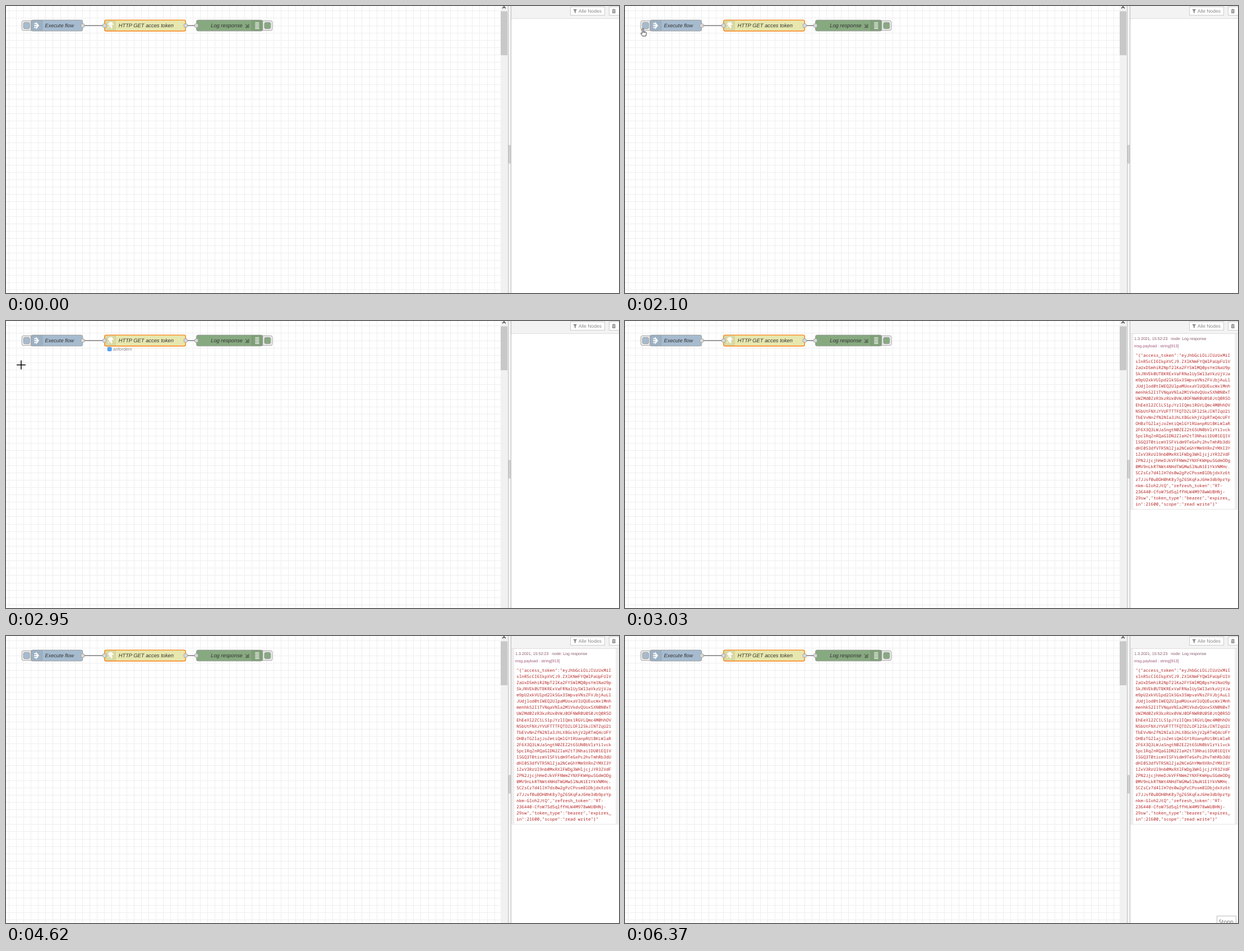
These frames come from a looping animation (1093 px wide and 513 px high, 6.44 s). An HTML page:

```html
<!DOCTYPE html>
<html lang="de">
<head>
<meta charset="utf-8">
<title>Flow editor</title>
<style>
html, body { margin: 0; width: 100%; height: 100%; overflow: hidden; background: #fff; }
svg { display: block; }
text { font-family: "Liberation Sans", Arial, sans-serif; white-space: pre; text-rendering: geometricPrecision; }
.label { font-style: italic; font-size: 9.35px; fill: #333; }
.meta { font-size: 7.15px; }
.payload text { font-family: "Noto Sans Mono", "DejaVu Sans Mono", monospace; font-size: 7.61px; font-weight: 500; fill: #b72828; }
.tip { font-family: "Open Sans", "Noto Sans", sans-serif; font-size: 9.6px; fill: #666; }
</style>
</head>
<body>
<svg id="stage" width="1093" height="513" viewBox="0 0 1093 513">
  <path id="grid" stroke="#eee" fill="none"/>

  <path d="M137 35H175.5M320.5 35H339.5" stroke="#999" stroke-width="2"/>

  <g stroke="#999" stroke-width=".9">
    <rect x="28.2" y="26.4" width="21" height="17.3" rx="3" fill="#eee"/>
    <rect x="31.2" y="29.3" width="11" height="11.4" rx="2.4" fill="#a6bbcf"/>
    <rect x="454" y="26.4" width="21" height="17.3" rx="3" fill="#eee"/>
    <rect x="460.8" y="29.3" width="11" height="11.4" rx="2.4" fill="#87a980"/>
    <rect x="44.5" y="25.1" width="92.2" height="19.7" rx="3" fill="#a6bbcf"/>
    <rect x="175.7" y="25.1" width="144.6" height="19.7" rx="3" fill="#e7e7ae" stroke="#ff7f0e" stroke-width="1.4"/>
    <rect x="339.5" y="25.1" width="118.3" height="19.7" rx="3" fill="#87a980"/>
  </g>
  <g fill="#000" fill-opacity=".06">
    <path d="M47.5 25.5H64.5V44.4H47.5Q45 44.4 45 41.6V28Q45 25.5 47.5 25.5Z"/>
    <path d="M178.5 25.9H195.3V44H178.5Q176.5 44 176.5 41.6V28Q176.5 25.9 178.5 25.9Z"/>
    <path d="M438.2 25.5H455Q457.4 25.5 457.4 28V41.6Q457.4 44.4 455 44.4H438.2Z"/>
  </g>
  <path d="M64.5 25.5V44.4M195.3 26V44M438.2 25.5V44.4" stroke="#000" stroke-opacity=".1" stroke-width=".7"/>

  <path d="M50.2 30.4H53.6V28L59 35L53.6 42V39.6H50.2V37.4H54.4V36H50.2V34H54.4V32.6H50.2Z" fill="#fff" fill-opacity=".95"/>
  <path d="M181 33.2L184 29.2L188.6 28.6L190.4 31L192.4 33.8L189.8 33.6L188.6 35.4L190 38.2L187.6 40.8L186.4 37.4L183.4 36.4L184.6 33.8ZM181 36.6L183.2 38.2L184.2 40.6Q181.6 39.4 181 36.6Z" fill="#fff" fill-opacity=".95"/>
  <path d="M444.2 29.5H451.4M444.2 32.2H451.4M444.2 34.9H451.4M444.2 37.6H451.4M444.2 40.3H451.4" stroke="#fff" stroke-width="1.2"/>

  <g id="ports" fill="#d9d9d9" stroke="#999" stroke-width=".8"/>

  <text class="label" x="69.6" y="38.1" style="font-size:9.1px">Execute flow</text>
  <text class="label" x="200.7" y="38.1">HTTP GET acces token</text>
  <text class="label" x="365.2" y="38.1">Log response</text>
  <path d="M426.6 32.2L430.6 36.4M427.8 36.6H430.8V33.4M426.8 38.4H432.8V32.2" fill="none" stroke="#333" stroke-width=".8"/>

  <g id="status">
    <rect x="181" y="46.8" width="7.2" height="7" rx="1.6" fill="#53a3f3" stroke="#4894e4" stroke-width=".6"/>
    <text x="190.8" y="53" font-size="7.95" fill="#888">anfordern</text>
  </g>

  <rect x="882" width="12.5" height="513" fill="#f1f1f1"/>
  <rect x="882" y="9.5" width="12.3" height="78.5" fill="#c8c8c8"/>
  <path d="M885.2 4.2L888 1.2L890.8 4.2" fill="none" stroke="#444" stroke-width="1.5"/>
  <rect x="894.5" width="6.5" height="513" fill="#f3f3f3"/>
  <path d="M895.5 0V513M900.5 0V513" stroke="#bbb"/>
  <rect x="896.7" y="248.8" width="2.5" height="32.4" rx="1" fill="#ddd" stroke="#aaa" stroke-width=".7"/>

  <rect x="901" width="192" height="22.5" fill="#f3f3f3"/>
  <path d="M901 22.5H1093" stroke="#ddd"/>
  <g fill="#fff" stroke="#ccc">
    <rect x="1006.5" y="1.5" width="61" height="15"/>
    <rect x="1075.5" y="1.5" width="20" height="15"/>
  </g>
  <g fill="#888">
    <path d="M1011.2 5.8H1018.2L1015.7 9V13L1013.7 11.7V9Z"/>
    <text x="1020.8" y="12" font-size="8.5">Alle Nodes</text>
    <path d="M1080.4 6.2H1082.2L1082.7 5.3H1084.9L1085.4 6.2H1087.2V7.1H1080.4ZM1081 7.5H1086.6V12.2Q1086.6 13 1085.8 13H1081.8Q1081 13 1081 12.2Z"/>
    <path d="M1082.6 8.4V11.8M1083.8 8.4V11.8M1085 8.4V11.8" stroke="#fff" stroke-width=".5"/>
  </g>

  <g id="message">
    <path d="M901 23H906.2V336H901ZM1087.2 23H1092.4V336H1087.2Z" fill="#eee"/>
    <path d="M901 336.5H1092.4" stroke="#e6e6e6"/>
    <text class="meta" x="908" y="34" fill="#86596e">1.3.2021, 15:52:23</text>
    <text class="meta" x="973.3" y="34" fill="#86596e">node: Log response</text>
    <text class="meta" x="907.8" y="47" fill="#a0597a">msg.payload : string[913]</text>
    <g id="payload" class="payload"></g>
  </g>

  <g id="tooltip">
    <rect x="1055.5" y="500.5" width="34" height="20" fill="#fff" stroke="#bbb"/>
    <text class="tip" x="1058.8" y="514.3">Stopp</text>
  </g>

  <path id="cross" d="M-8 0H8M0 -8V8" stroke="#000" stroke-width="1.5"/>
  <path id="hand" d="M-1.4 8.4V-.2Q-.2 -1.8 1 -.2V4.6L5 5.6Q6.2 6 6.2 7.2L5.2 12.8H-.6L-3.8 8.6Q-3.8 7 -2.4 7.4ZM1 4.6V7M3 5.2V7.2" fill="#fff" stroke="#222" stroke-width=".9" stroke-linejoin="round"/>
  <circle id="click" cx="36.3" cy="34.6" r="9.4" fill="#f2ef4a" style="mix-blend-mode:multiply"/>
  <path id="arrow" d="M.4 .6V10.6L2.8 8.4L4.4 12.2L6 11.5L4.4 7.9H7.5Z" fill="#fff" stroke="#000" stroke-width=".7"/>
</svg>
<script>
const NS = "http://www.w3.org/2000/svg";
const LOOP = 6440;
const CELL = 13.12;
const $ = id => document.getElementById(id);

function add(parent, tag, attrs, text = "") {
  const el = document.createElementNS(NS, tag);
  for (const key in attrs) el.setAttribute(key, attrs[key]);
  el.textContent = text;
  parent.append(el);
}

const payload = `"{"access_token":"eyJhbGciOiJIUzUxMiI
sInR5cCI6IkpXVCJ9.ZXlKNmFYQWlPaUpFUlV
ZaUxDSmhiR2NpT2lKa2FYSWlMQ0psYm1NaU9p
SkJNVEk0UTBKRExVaFRNalUySWl3aVkzUjVJa
m9pU2xkVUlpd2lkSGx3SWpvaVNsZFVJbjAuLl
JUdjlod0tIWEQ2UlpaMUoxaVlUQUEucWx1Mnh
menhkS2I1TVNqaVNla2M1VkdvQUoxSXN0N0xT
UWZMd0ZrR3kzRUx0VWJ0OFNWR0U0S0JtQ0R5O
EhEeXl2ZC1LS1pJYzlIQms1RGVLQmc4M0hhOV
N5bUtFNXJYVUFTTTFQTDZLOFl2SkJINTZqU21
TbEVvNnZfN2NIa3JhLXBGckhjV2pRTmQ4cUFY
OHBzTGZlajJoZmtiQmlGY1RUanpRU1BKLWlaR
2F6X3Q3LWJaSngtN0ZEZ2t6SUN0bVlrYi1vck
5pclRqZnRQaGlDN2ZIaHZtT3Nhai1DU01EQ1V
lSGQ3T0ticmVISFVidm9TeGxPc2hvTmhRb3dU
dHI0S3dfVTR5NlZja2NCeGhYMm9XRnZYMXI3Y
1ZxV3RrUl9nb0MxRXlFWDg3WHljcjJYR3ZVdF
ZPN2JjcjhHeDJkVFFNWmZYNXFKWHpuSGdmODg
0MV9nLkRTNWt4NHdTWGMwSlNuN1E1YkVNMHc.
SCZsCz7d4lIH7ds0w2gPzCPosmBlDbjdxXz6t
z7JJsf0uBOH0hK8y7gZ6SKqFaJ6He3db9prYp
nkm-GIoh2JtQ","refresh_token":"RT-
236440-CfoW7Sd5qlffHLW4M978wWUBHNj-
29sw","token_type":"bearer","expires_
in":21600,"scope":"read write"}"`;

payload.split("\n").forEach((line, i) =>
  add($("payload"), "text", { x: 910.2, y: 63.9 + i * 11.08 }, line));

for (const x of [136.7, 175.7, 320.3, 339.5])
  add($("ports"), "rect", { x: x - 3.2, y: 31.8, width: 6.4, height: 6.4, rx: 1.9 });

let grid = "";
for (let x = 5.2; x < 882; x += CELL) grid += `M${Math.floor(x) + 0.5} 0V513`;
for (let y = 8.8; y < 513; y += CELL) grid += `M0 ${Math.floor(y) + 0.5}H882`;
$("grid").setAttribute("d", grid);

// Each step holds until the next: [start, shape, x, y]
const pointerSteps = [
  [0], [1700, "cross", 4, 31], [1780, "cross", 10, 40], [1860, "cross", 16, 46],
  [1940, "cross", 22, 49], [2020, "cross", 27, 46], [2090, "hand", 32, 41],
  [2170, "hand", 35, 37], [2250, "hand", 36, 35], [2950, "cross", 27, 78.5], [3030],
  [4370, "arrow", 968, 497], [4540, "arrow", 985, 502], [4620]
];
const tooltipSteps = [[0, 0], [6130, 0.35], [6200, 0.75], [6370, 1]];

const current = (steps, t) => steps.findLast(step => step[0] <= t);
const show = (id, visible) => $(id).setAttribute("visibility", visible ? "visible" : "hidden");

function render(t) {
  const [, shape, x, y] = current(pointerSteps, t);
  for (const id of ["cross", "hand", "arrow"]) {
    show(id, id === shape);
    if (id === shape) $(id).setAttribute("transform", `translate(${x} ${y})`);
  }
  show("click", t >= 2480 && t < 2570);
  show("status", t >= 2630 && t < 3030);
  show("message", t >= 3030);
  $("tooltip").setAttribute("opacity", current(tooltipSteps, t)[1]);
}

const start = performance.now();
function tick() {
  render((performance.now() - start) % LOOP);
  requestAnimationFrame(tick);
}
tick();
</script>
</body>
</html>
```
